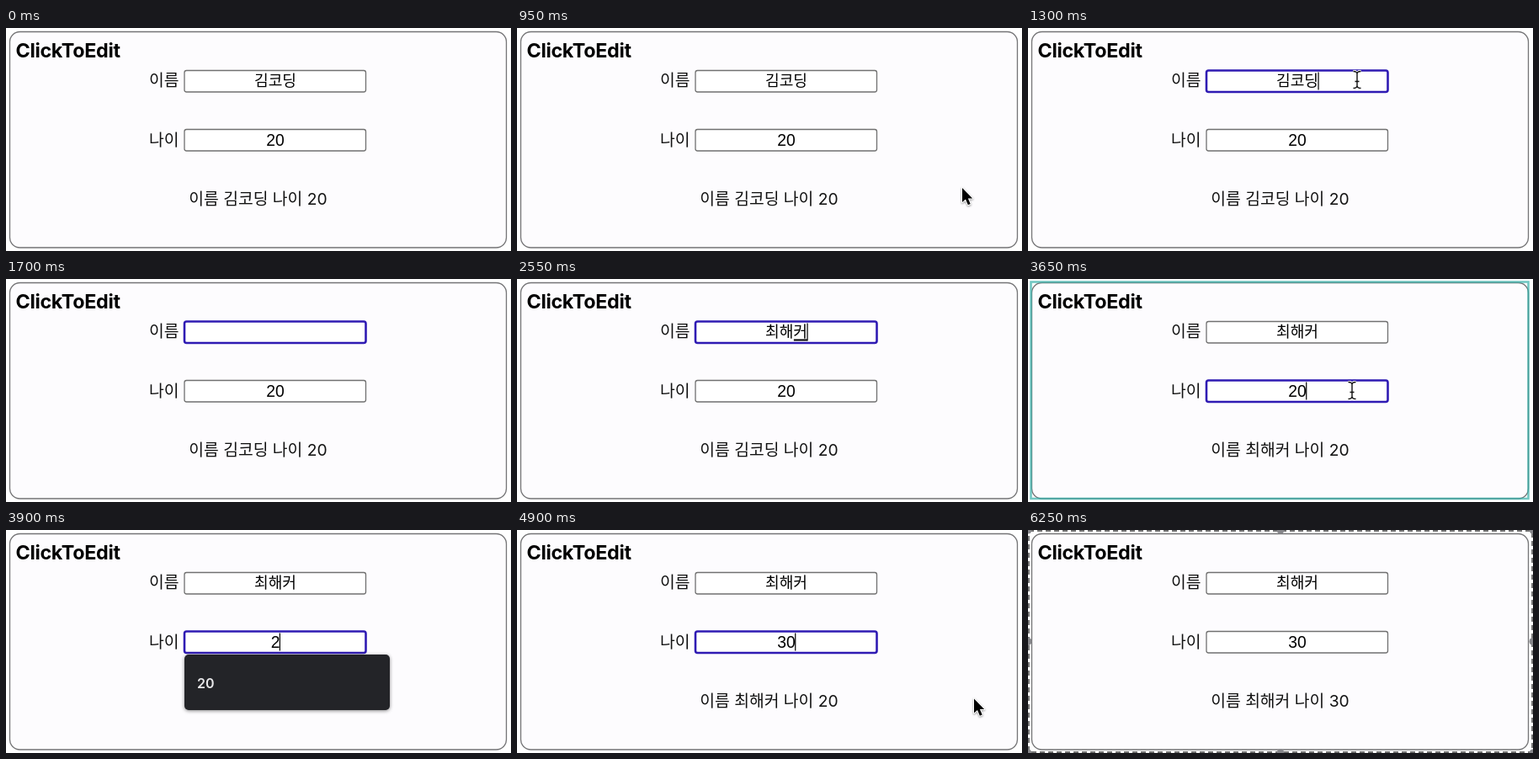
Write an HTML page that moves like this. It is 600 px wide and 265 px high and loops after 6.9 s.

```html
<!DOCTYPE html>
<html lang="ko">
<head>
<meta charset="utf-8">
<title>ClickToEdit</title>
<style>
  html, body { margin: 0; width: 100%; height: 100%; overflow: hidden; background: #fff; }
  svg { display: block; width: 100%; height: 100%; }
  text { font: 19.3px Inter, "Noto Sans CJK KR", sans-serif; fill: #111; white-space: pre; }
  .title { font-size: 23.3px; font-weight: 700; letter-spacing: -.3px; fill: #000; }
  .mid { text-anchor: middle; }
  .hangul { font: 18.15px "Noto Sans CJK KR", sans-serif; fill: #000; }
  .digits { font: 19.3px "Liberation Sans", Arial, sans-serif; fill: #000; }
  .option { font-size: 16px; font-weight: 600; fill: #e8e8ea; }
  .field { fill: #fff; stroke: #707070; stroke-width: 1.3; }
  .field.focus { stroke: #2f1bb3; stroke-width: 2.6; }
</style>
</head>
<body>
<svg viewBox="0 0 600 265">
  <rect x="4.5" y="4.5" width="590" height="256.5" rx="12" fill="#fdfcfe" stroke="#747476" stroke-width="1.3"/>
  <rect id="ring" x="3.5" y="3.5" width="591" height="257.5" fill="none" stroke="#37afa9" stroke-opacity=".7" stroke-width="2.6"/>
  <text class="title" x="11.5" y="35">ClickToEdit</text>
  <text x="170" y="69">이름</text>
  <text x="170" y="139.8">나이</text>
  <rect id="nameField" class="field" x="212" y="50.5" width="215.5" height="25.5" rx="2.5"/>
  <rect id="ageField" class="field" x="212" y="120.5" width="215.5" height="25.5" rx="2.5"/>
  <text id="name" class="mid hangul" x="320" y="68.7"></text>
  <text id="age" class="mid digits" x="320" y="140.3"></text>
  <rect id="underline" y="71.5" width="16" height="2"/>
  <rect id="caret" width="1.2" height="21"/>
  <text id="result" class="mid" x="299.5" y="210"></text>
  <g id="dropdown">
    <rect x="212" y="148" width="244" height="66" rx="5" fill="#232428" style="filter: drop-shadow(0 1px 2px #0007)"/>
    <text class="option" x="227" y="187.5">20</text>
  </g>
  <g id="arrow" style="filter: drop-shadow(0 1px 1.2px #0006)">
    <path d="M0 0V17L4 13.4L6.9 20.2L9.7 19L6.9 12.4H12.2Z" stroke="#fff" stroke-width="2" stroke-linejoin="round" paint-order="stroke"/>
  </g>
  <g id="beam" fill="none">
    <path id="beamShape" d="M-4.5-9.5Q0-9.5 0-6.5Q0-9.5 4.5-9.5M0-6.5V7.5M-4.5 10.5Q0 10.5 0 7.5Q0 10.5 4.5 10.5M-2.5 2.5H2.5" stroke="#fff" stroke-width="3"/>
    <use href="#beamShape"/>
    <path d="M-4.5-9.5Q0-9.5 0-6.5Q0-9.5 4.5-9.5M0-6.5V7.5M-4.5 10.5Q0 10.5 0 7.5Q0 10.5 4.5 10.5M-2.5 2.5H2.5" stroke="#111" stroke-width="1.4"/>
  </g>
  <g id="selection" fill="#86868a">
    <rect x="1" y="1" width="598" height="263" fill="none" stroke="#444" stroke-width="1.4" stroke-dasharray="6 4"/>
  </g>
</svg>
<script>
const LOOP = 6900, STEP = 50;
const $ = id => document.getElementById(id);

// Each track holds [start time, value] pairs with hard changes.
const nameTrack = [[0, '김코딩'], [1400, '김코'], [1450, '김'], [1500, ''],
  [1950, 'ㅊ'], [2000, '초'], [2050, '최'],
  [2300, '최ㅎ'], [2350, '최해'], [2400, '최햌'], [2550, '최해커']];
const ageTrack = [[0, '20'], [3850, '2'], [3950, ''], [4250, '3'], [4400, '30']];
const focusTrack = [[0, ''], [1150, 'name'], [3150, ''], [3600, 'age'], [4950, '']];
const resultTrack = [[0, '이름 김코딩 나이 20'], [3150, '이름 최해커 나이 20'], [4950, '이름 최해커 나이 30']];

// Pointer trips: shown from start, moving until arrive, gone at hide.
const trips = [
  { start: 900, arrive: 1150, hide: 1350, from: [545, 205], to: [391, 61] },
  { start: 2800, arrive: 3100, hide: 3300, from: [391, 61], to: [517, 192] },
  { start: 3300, arrive: 3600, hide: 3850, from: [517, 192], to: [385, 132] },
  { start: 4650, arrive: 4900, hide: 5400, from: [385, 132], to: [543, 200.5] }
];

const at = (track, t) => track.filter(([start]) => start <= t).pop()[1];
const within = (t, a, b) => t >= a && t < b;
const show = (id, on) => $(id).style.display = on ? '' : 'none';
const place = (id, x, y) => $(id).setAttribute('transform', `translate(${x} ${y})`);

for (const x of [0, 300, 600]) for (const y of [0, 132.5, 265]) {
  if (x === 300 && y === 132.5) continue;
  const handle = document.createElementNS('http://www.w3.org/2000/svg', 'circle');
  handle.setAttribute('cx', x);
  handle.setAttribute('cy', y);
  handle.setAttribute('r', 4.5);
  $('selection').append(handle);
}

function drawPointer(t) {
  const trip = trips.find(p => within(t, p.start, p.hide));
  show('arrow', false);
  show('beam', false);
  if (!trip) return;
  const k = Math.min(1, (t - trip.start) / (trip.arrive - trip.start));
  const ease = k * k * (3 - 2 * k);
  const [x, y] = trip.from.map((a, i) => a + (trip.to[i] - a) * ease);
  const overField = within(x, 212, 428) && (within(y, 50, 77) || within(y, 120, 147));
  const shape = overField ? 'beam' : 'arrow';
  show(shape, true);
  place(shape, x, y);
  $('arrow').style.opacity = t >= 5350 ? .5 : 1;
}

function draw(t) {
  const name = at(nameTrack, t), age = at(ageTrack, t), focus = at(focusTrack, t);
  $('name').textContent = name;
  $('age').textContent = age;
  $('result').textContent = at(resultTrack, t);
  $('nameField').classList.toggle('focus', focus === 'name');
  $('ageField').classList.toggle('focus', focus === 'age');

  const textWidth = focus === 'name' ? name.length * 16.7 : age.length * 10.73;
  const caretX = 320 + textWidth / 2;
  show('caret', focus && !within(t, 1700, 1950));
  $('caret').setAttribute('x', caretX - .6);
  $('caret').setAttribute('y', focus === 'name' ? 52.5 : 122.5);
  show('underline', within(t, 1950, 3150));
  $('underline').setAttribute('x', caretX - 16.2);

  show('ring', [1150, 3150, 3600, 4950].some(start => within(t, start, start + 150)));
  show('dropdown', within(t, 3850, 4000));
  $('dropdown').style.opacity = t >= 3950 ? .5 : 1;
  show('selection', t >= 6250);
  drawPointer(t);
}

const origin = performance.now();
function tick() {
  const t = (performance.now() - origin) % LOOP;
  draw(Math.floor(t / STEP) * STEP);
  requestAnimationFrame(tick);
}
tick();
</script>
</body>
</html>
```
